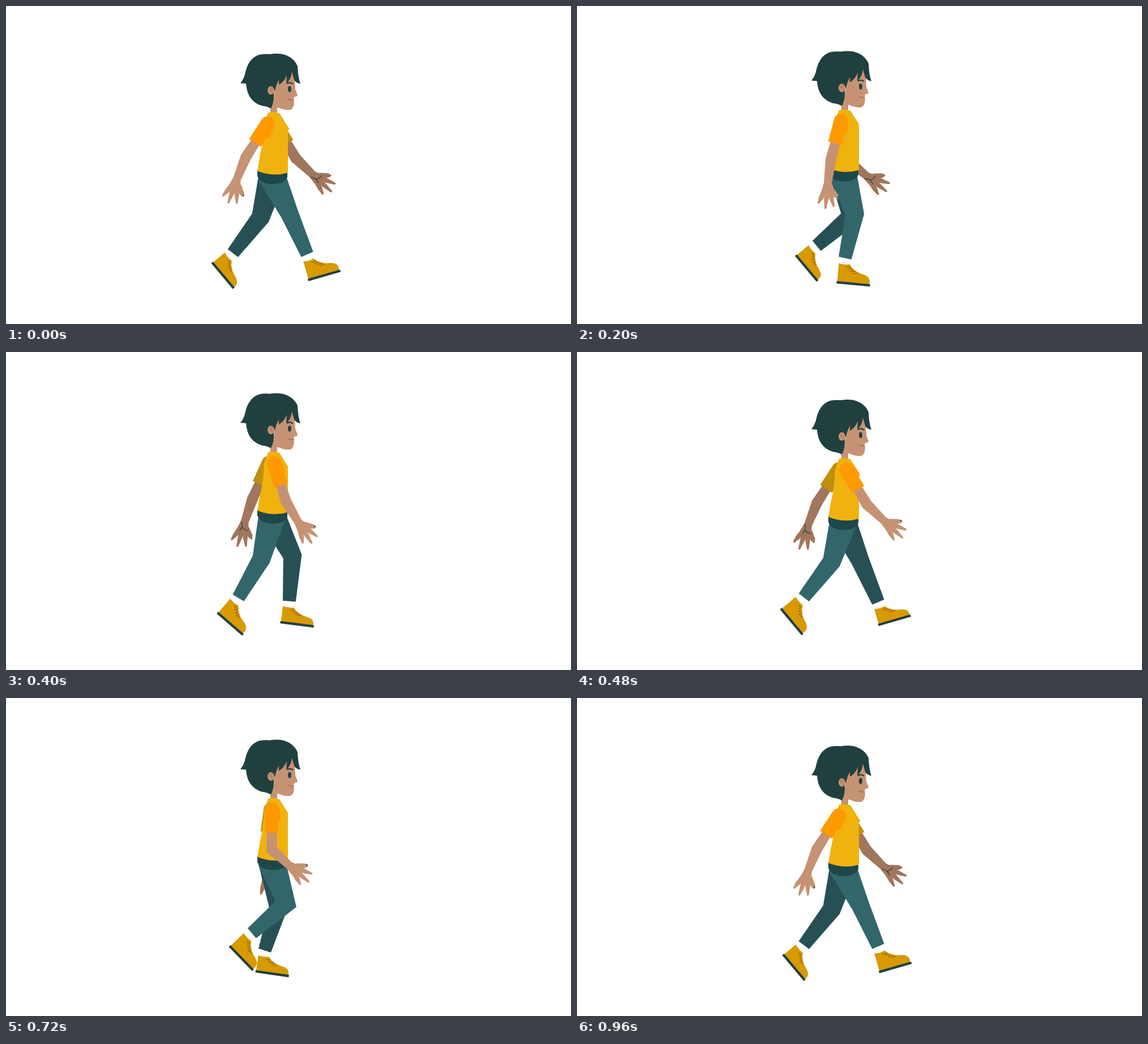
An HTML page with a canvas that plays this animation: 998x561 px, repeating every 1 s.

```html
<!DOCTYPE html>
<html lang="en">
<head>
<meta charset="utf-8">
<title>Walk cycle</title>
<style>
html, body { margin: 0; width: 100%; height: 100%; overflow: hidden; background: #fff; }
canvas { display: block; }
</style>
</head>
<body>
<canvas id="stage" width="998" height="561"></canvas>
<script>
const ctx = document.getElementById('stage').getContext('2d');
const LOOP = 1000, STEP = 40, BEAT = 120, HALF = 480;
const C = {
  hair: '#20403f', skin: '#c69274', skinFar: '#a0765d', line: '#8f5f49',
  shirt: '#f0b30d', sleeve: '#ff9900', sleeveFar: '#bf900c',
  hips: '#1d474b', pants: '#32666a', pantsFar: '#275055',
  shoe: '#d79a00', lace: '#a3620c', sole: '#213f42'
};

// Poses one beat apart: contact, down, pass, up, then the same for the other side.
// Limb angles are degrees forward of straight down; the foot turns toe down.
const walk = {
  bob: [0, 7.5, -10.5, -17],
  thigh: [25, 32, 9.7, -12.5, -14, -4.5, 20, 32],
  shin: [23.5, -2.5, -17.7, -27, -38, -51, -49.5, -18],
  foot: [-16, 0, 8, 36, 50, 58, 46, 19],
  upper: [-33, -28, -8, 11, 30, 20, 0, -20],
  fore: [-22, -28, 3, 23, 46, 55, 48, -17]
};

function key(name, t) {
  const list = walk[name], n = list.length, i = Math.floor(t / BEAT);
  const a = list[i % n], b = list[(i + 1) % n];
  return a + (b - a) * (t / BEAT - i);
}

function reach([x, y], len, deg) {
  const a = deg * Math.PI / 180;
  return [x + len * Math.sin(a), y + len * Math.cos(a)];
}

function fill(d, color) {
  ctx.fillStyle = color;
  ctx.fill(new Path2D(d));
}

function stroke(d, color, width) {
  ctx.strokeStyle = color;
  ctx.lineWidth = width;
  ctx.lineCap = ctx.lineJoin = 'round';
  ctx.stroke(new Path2D(d));
}

function oval(x, y, rx, ry, color) {
  ctx.fillStyle = color;
  ctx.beginPath();
  ctx.ellipse(x, y, rx, ry, 0, 0, 7);
  ctx.fill();
}

function at([x, y], deg, draw) {
  ctx.save();
  ctx.translate(x, y);
  ctx.rotate(deg * Math.PI / 180);
  draw();
  ctx.restore();
}

// Mitred tube through joints, given half widths
function limb(joints, half, color) {
  const dir = (a, b) => Math.atan2(b[1] - a[1], b[0] - a[0]);
  const n = joints.length - 1, left = [], right = [];
  joints.forEach((p, i) => {
    const a = dir(joints[Math.max(i - 1, 0)], joints[Math.max(i, 1)]);
    const b = dir(joints[Math.min(i, n - 1)], joints[Math.min(i + 1, n)]);
    const turn = Math.atan2(Math.sin(b - a), Math.cos(b - a)) / 2;
    const w = half[i] / Math.cos(turn);
    const x = -Math.sin(a + turn) * w, y = Math.cos(a + turn) * w;
    left.push([p[0] + x, p[1] + y]);
    right.unshift([p[0] - x, p[1] - y]);
  });
  fill('M' + left.concat(right).map(p => p.join()).join('L') + 'Z', color);
}

function shoe(ankle, deg, tall) {
  at(ankle, deg, () => {
    ctx.translate(-11, 10 + 37 * tall);
    ctx.scale(1, tall);
    fill('M1-3V-37Q11-34 20-37L25-30Q31-25 40-22Q52-20 56-15Q60-8 57-3Z', C.shoe);
    for (let i = 0; i < 4; i++) {
      stroke(`M${15 + i * 4.3} ${-31 + i * 3.4}l8-.8`, C.lace, 1.5);
    }
    ctx.scale(1, 1 / tall);
    fill('M0-3.8H59.5V.5H0Z', C.sole);
  });
}

function leg(t, color, far) {
  const dy = key('bob', t), hip = [470, 301 + dy];
  const root = [468, (far ? 299 : 296) + dy * .45];
  const knee = reach(root, 77, key('thigh', t));
  const ankle = reach(knee, 79, key('shin', t));
  shoe(ankle, key('foot', t), far ? .82 : .96);
  oval(...hip, 24, 24, color);
  limb([hip, knee, ankle], [24, 16, 11.5], color);
}

function hand(color, far) {
  fill('M-4 6.5L8 9L19 11L23 0L18-11L7-10L-4-6.5Z', color);
  for (let i = 0; i < 4; i++) {
    const len = 42 - 4 * (i - 1.25) ** 2;
    at([0, 0], 22 - 21 * i, () => {
      limb([[10, 0], [26, 0], [len, 0]], [4.8, 4, 1.8], color);
      oval(len, 0, 1.8, 1.8, color);
    });
  }
  if (far) stroke('M-2 6Q3 2 8 2Q11-3 11-9M8 2L15 4', C.hair, 1.2);
  else stroke('M20-20.5L22-20', C.hair, 1.8);
}

function arm(t, skin, cloth, far) {
  const up = key('upper', t), fore = key('fore', t);
  const shoulder = [469.5 + up * .22, 207 + key('bob', t)];
  const cuff = reach(shoulder, 41, up);
  const elbow = reach(shoulder, 71, up);
  const wrist = reach(elbow, 44, fore);
  limb([shoulder, cuff, elbow, wrist], [8, 8.5, 9.5, 6.7], skin);
  at(wrist, 87 - fore, () => hand(skin, far));
  at(shoulder, 90 - up, () => fill(
    'M0 12.5C-16 12-16-12 0-13Q12-16 20-16L22-12L41-12.5V12.5Z', cloth));
}

function torso() {
  fill('M444 289V300Q450 314 471 314Q492 314 497 302V289Z', C.hips);
  fill('M463 188Q472 186 483 189L498 213V294Q472 302 444 291L449 262Q455 238 456 208Z', C.shirt);
}

function head() {
  fill('M467 160H479V189H467Z', C.skin);
  fill('M474 125L508 112Q511 130 511 147L515 157Q515 160 510 160L508 163L509 170' +
    'Q508 182 502 183Q496 185 480 179L473 181Z', C.skin);
  fill('M414 136Q421 128 423 116Q429 92 447 86Q456 84 466 85Q478 83 489 85' +
    'Q508 90 515 106Q516 127 520 137Q512 136 509 130L505 116Q504 129 495 137L496 122' +
    'Q491 134 482 139L482 130Q477 139 475 149L473 150Q474 170 468 181Q462 177 452 176' +
    'Q426 168 424 137Z', C.hair);
  oval(468, 149, 6, 7.5, C.skin);
  stroke('M472 145Q467 143 466 149M467 148Q471 149 470 153', C.line, .9);
  oval(501, 146.5, 3, 5.5, C.hair);
  stroke('M497 136.5Q502 134 506 137', C.hair, 2.4);
  stroke('M498 164Q503 167 508 165.5', C.line, 1.2);
}

function draw(t) {
  ctx.fillStyle = '#fff';
  ctx.fillRect(0, 0, 998, 561);
  arm(t + HALF, C.skinFar, C.sleeveFar, true);
  leg(t + HALF, C.pantsFar, true);
  leg(t, C.pants, false);
  at([0, key('bob', t)], 0, () => {
    head();
    torso();
  });
  arm(t, C.skin, C.sleeve, false);
}

const start = performance.now();
function tick() {
  const ms = (performance.now() - start) % LOOP;
  let step = Math.floor(ms / STEP);
  if (step === 15) step = 14; // this pose holds for an extra step
  draw(step * STEP);
  requestAnimationFrame(tick);
}
tick();
</script>
</body>
</html>
```
